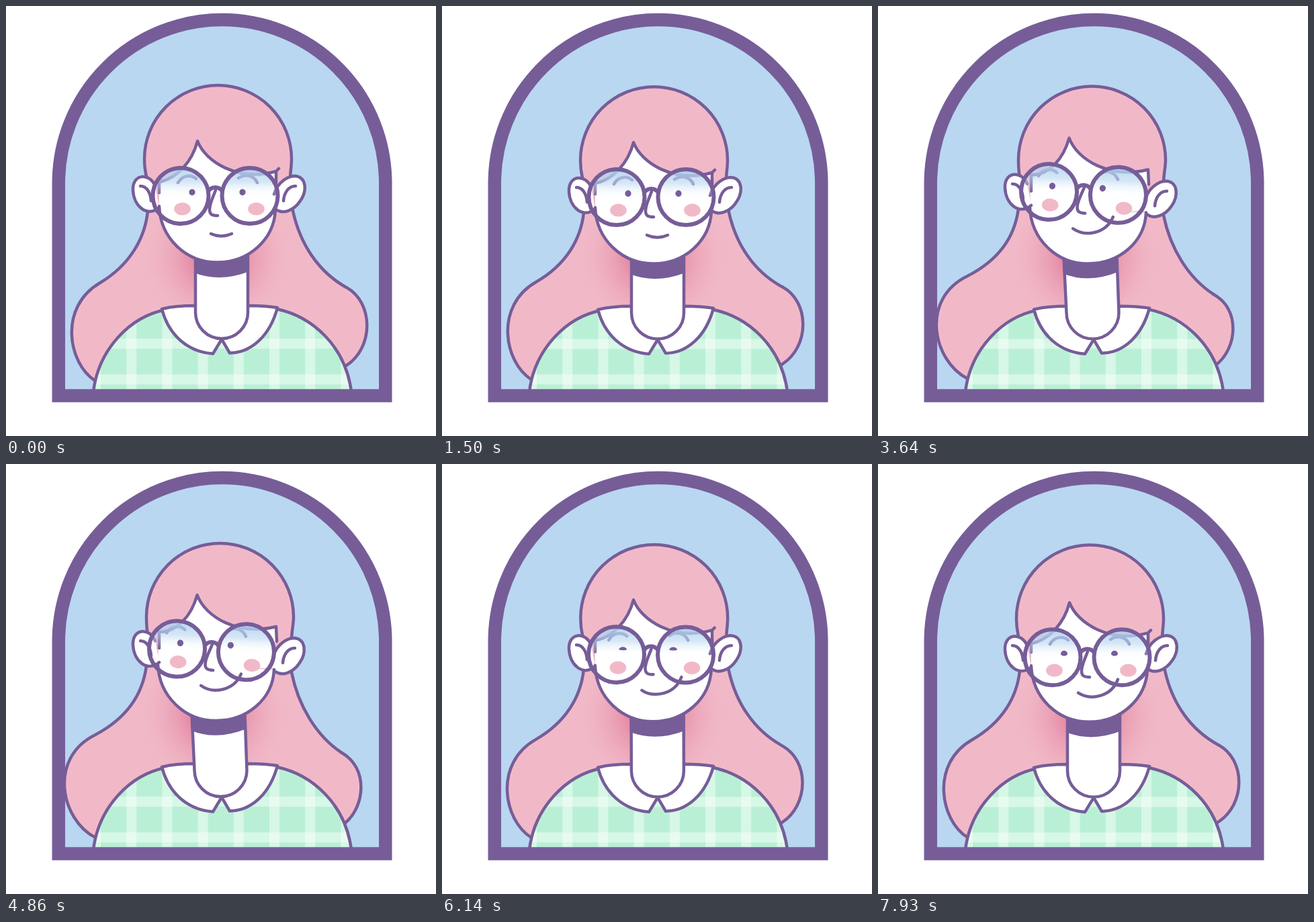
Write an HTML page that moves like this. It is 640 px wide and 640 px high and loops after 8000 ms.

```html
<!DOCTYPE html>
<html lang="en">
<head>
<meta charset="utf-8">
<title>Portrait in an arched window</title>
<style>
html, body { margin: 0; width: 100%; height: 100%; overflow: hidden; background: #fff; }
svg { display: block; width: 100vw; height: 100vh; }
.line { stroke: #765d98; stroke-width: 4.5; stroke-linecap: round; stroke-linejoin: round; }
.bare { fill: none; }
.white { fill: #fff; }
.dark { fill: #765d98; }
.pink { fill: #f1b9c8; }
</style>
</head>
<body>
<svg viewBox="0 0 640 640">
  <defs>
    <radialGradient id="glow" gradientUnits="userSpaceOnUse" cx="314" cy="372" r="116">
      <stop offset=".3" stop-color="#e58aa4"/>
      <stop offset="1" stop-color="#f1b9c8" stop-opacity="0"/>
    </radialGradient>
    <linearGradient id="lens" x2="0" y2="1">
      <stop offset="0" stop-color="#b0d2f0" stop-opacity=".9"/>
      <stop offset=".25" stop-color="#b9d7f1" stop-opacity=".6"/>
      <stop offset=".52" stop-color="#fff" stop-opacity="0"/>
    </linearGradient>
    <clipPath id="shirt"><path d="M130 574C138 510 185 462 238 452L403 451C455 462 505 505 514 574Z"/></clipPath>
  </defs>

  <path fill="#b9d7f1" d="M78.3 580V263.8A243.2 243.2 0 0 1 564.8 263.8V580Z"/>
  <path id="hair" class="pink line"/>
  <circle id="shade" cx="314" cy="372" r="116" fill="url(#glow)"/>

  <g id="body">
    <g clip-path="url(#shirt)">
      <path fill="#b9f0d5" d="M120 440H530V580H120Z"/>
      <path id="plaid" stroke="#fff" stroke-opacity=".42" stroke-width="15" fill="none"/>
    </g>
    <path class="bare line" d="M130 574C138 510 185 462 238 452M403 451C455 462 505 505 514 574"/>
    <path class="white line" d="M232 451Q252 446 282 446L321 496L308 517.5C271 515 242 490 232 451ZM404 449Q386 446 360 446L321 496L333 516.5C366 516 393 490 404 449Z"/>
    <path id="neck" class="white line"/>
  </g>

  <g id="head">
    <path id="shadow" class="dark"/>
    <path id="skin" class="white" d="M228 262H402V304H228Z"/>
    <g id="earL">
      <path class="white line" d="M222 268C214 248 188 249 189 274C190 298 210 315 228 300"/>
      <path class="bare line" d="M200 268C209 268 215 277 216 290"/>
    </g>
    <g id="earR">
      <path class="white line" d="M399 280C404 262 420 253 430 253C448 254 448 276 438 290C428 305 412 310 402 303"/>
      <path class="bare line" d="M431 268C421 268 414 277 413 290"/>
    </g>
    <path id="face" class="white line"/>
    <g id="features">
      <ellipse class="pink" cx="262.5" cy="302" rx="12.3" ry="9.6"/>
      <ellipse class="pink" cx="372.5" cy="302" rx="12.3" ry="9.6"/>
      <path id="brows" class="bare line" d="M256 263C262 252 275 250 283 257M346 256C356 249 369 252 374 263"/>
      <path class="bare line" d="M312 274C308 285 303 294 303 303C303 311 308 312 315 312"/>
      <path id="mouth" class="bare line"/>
      <g fill="url(#lens)" stroke="#765d98" stroke-width="6">
        <circle cx="260" cy="282.5" r="41.5"/>
        <circle cx="363" cy="282.5" r="41.5"/>
        <path class="bare" d="M301 276C306 268 317 268 322 276"/>
      </g>
      <path id="eyes" class="dark"/>
    </g>
  </g>
  <path fill="none" stroke="#765d98" stroke-width="19.5" d="M78.3 580V263.8A243.2 243.2 0 0 1 564.8 263.8V580Z"/>
</svg>
<script>
const LOOP = 8000, BOB = 4760;
const el = id => document.getElementById(id);
const set = (id, d) => el(id).setAttribute('d', d);
const place = (id, transform) => el(id).setAttribute('transform', transform);

// Each shape: resting path, then the paths it can lean towards.
const hair = [
  'M133 558C92 532 78 448 140 412C185 385 207 345 211 305L210 258C207 247 206 237 206 227.5A109.5 109.5 0 0 1 425 227.5C425 238 423 248 423 258L427 305C438 355 465 395 505 418C548 440 548 510 505 536',
  'M133 556C82 530 62 438 133 403C182 377 204 340 209 300L212 258C209 247 209 237 209 227.5A109.5 109.5 0 0 1 428 227.5C428 238 425 250 425 262L425 310C435 360 462 405 500 430C540 453 534 510 505 534',
  'M133 555C92 529 78 445 140 410C185 385 207 347 211 308L210 261C207 250 206 240 206 230.7A109.5 109.5 0 0 1 425 230.7C425 241 423 251 423 261L427 308C438 357 465 395 505 417C548 438 548 507 505 533'
];
const face = [
  'M228 278L228 262C255 256 277 232 285 201C297 232 345 262 402 246L406 242L402 246L402 264M228 298C230 346 268 381.5 314.5 381.5C361 381.5 399 348 401 303',
  'M228 274L228 250C255 250 276 226 284.5 195C297 228 345 256 402 242L402 242L402 242L403 264M226 298C228 346 266 382 312.5 382C359 382 397 350 399 306',
  'M228 278L228 265C255 259 277 235 285 204C297 235 345 265 402 249L406 245L402 249L402 264M228 298C230 346 268 381.5 314.5 381.5C361 381.5 399 348 401 303'
];
const neck = [
  'M282 372L282 456A39 39 0 0 0 360 456L360 372',
  'M276.5 372L280.5 456A39 39 0 0 0 358.5 456L355.5 372'
];
const shadow = [
  'M280 370L280 397Q318 412 362 395L362 370Z',
  'M275 370L276 397Q314 412 358 394L357 370Z'
];
const mouth = [
  'M305 339C315 343.5 326 343.5 336 339',
  'M298 335.5C316 347 347 342 357 315.5'
];

const numbers = path => path.match(/-?[\d.]+/g).map(Number);
function blend([rest, ...targets], ...weights) {
  const base = numbers(rest), goals = targets.map(numbers);
  let i = 0;
  return rest.replace(/-?[\d.]+/g, () => {
    const v = goals.reduce((sum, goal, k) => sum + (goal[i] - base[i]) * weights[k], base[i]);
    i++;
    return +v.toFixed(2); // arc flags must stay plain 0 or 1
  });
}

function ease(t, from, to) {
  const u = Math.min(1, Math.max(0, (t - from) / (to - from)));
  return u * u * (3 - 2 * u);
}
const blinkAt = (t, centre) => Math.max(0, 1 - Math.abs(t - centre) / 200);

function eye(x, y, blink) {
  const rx = 4.6 + 1.5 * blink, top = 4.6 - blink, bottom = 4.6 * (1 - blink) + 0.5;
  return `M${x - rx} ${y}A${rx} ${top} 0 0 1 ${x + rx} ${y}A${rx} ${bottom} 0 0 1 ${x - rx} ${y}Z`;
}

let plaid = '';
for (let i = 0; i < 8; i++) plaid += `M${133.5 + 53.2 * i} 440V580`;
set('plaid', plaid);
// Horizontal bands are a second layer, so crossings come out lighter.
const bands = el('plaid').cloneNode();
bands.removeAttribute('id');
bands.setAttribute('d', 'M120 502.5H530M120 555.7H530');
el('plaid').after(bands);

function draw(now) {
  const t = now % LOOP;
  const low = (1 - Math.cos((t - 70) / BOB * 2 * Math.PI)) / 2;
  const smile = ease(t, 1550, 2550);
  const turn = smile - ease(t, 5150, 6350);
  const look = ease(t, 1900, 2500) - ease(t, 5900, 6450);
  const nod = ease(t, 7290, 7950);
  const blink = Math.max(...[2430, 6170, 8070].map(c => blinkAt(t, c)));
  const gaze = `translate(${-12.5 * look} ${-3.6 * look})`;

  set('hair', blend(hair, turn, low));
  set('face', blend(face, turn, nod));
  set('neck', blend(neck, turn));
  set('shadow', blend(shadow, turn));
  set('mouth', blend(mouth, smile));
  set('eyes', eye(277, 277, blink) + eye(352, 277, blink));

  place('body', `translate(0 ${5.74 * low}) scale(1 ${1 - 0.01 * low})`);
  place('head', `translate(0 ${3 * low})`);
  place('shade', `translate(${-5 * turn} ${2 * low})`);
  place('skin', `translate(${-1.5 * turn} 0)`);
  place('earL', `translate(0 ${-4.8 * turn})`);
  place('earR', `translate(${-turn} ${6 * turn})`);
  place('features', `translate(${-5.5 * turn} ${-5 * turn + 2.8 * nod}) rotate(${2.6 * turn} 313 282)`);
  place('brows', gaze);
  place('eyes', gaze);
}

const start = performance.now();
function frame() {
  draw(performance.now() - start);
  requestAnimationFrame(frame);
}
frame();
</script>
</body>
</html>
```
